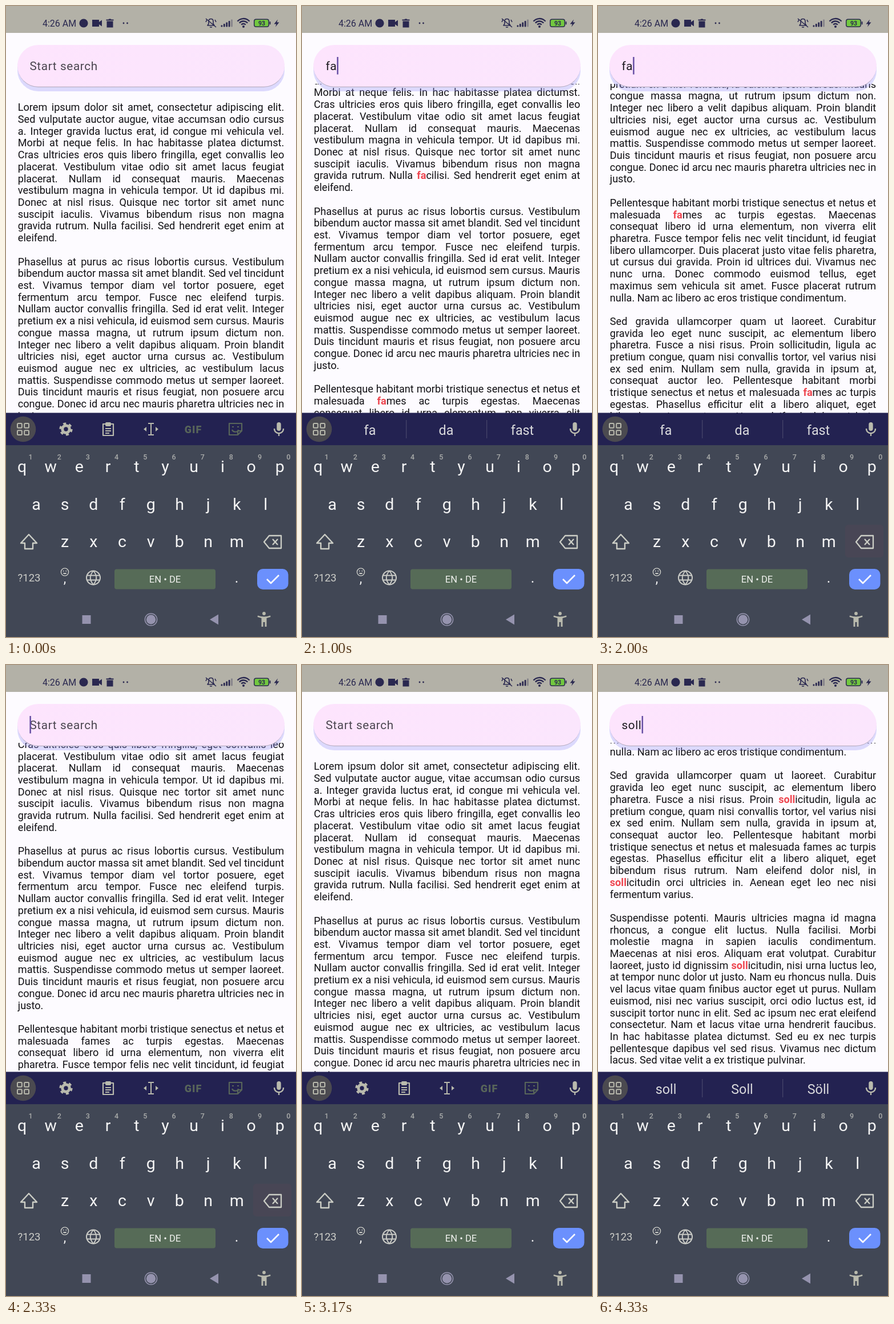
Recreate the animation shown at these times as an HTML page with a canvas. Size 508x1102 px, loop 4490 ms.

```html
<!DOCTYPE html>
<html lang="en">
<head>
<meta charset="utf-8">
<title>Text search</title>
<style>
html, body { margin: 0; width: 100%; height: 100%; overflow: hidden; background: #fdfbff; }
canvas { display: block; width: 508px; height: 1102px; }
</style>
</head>
<body>
<canvas id="stage"></canvas>
<script>
const W = 508, H = 1102, LOOP = 4490;
const LINE = 20.71, LEFT = 20.8, RIGHT = 487.2, MAX_SCROLL = 771, OMEGA = 0.016;
const FONT = 'Roboto, sans-serif';
const ICON = '#b9baad', KEY = '#f5f5f5', KEYBOARD = '#414755', INK = '#2a2850';

const lines = `Lorem ipsum dolor sit amet, consectetur adipiscing elit.
Sed vulputate auctor augue, vitae accumsan odio cursus
a. Integer gravida luctus erat, id congue mi vehicula vel.
Morbi at neque felis. In hac habitasse platea dictumst.
Cras ultricies eros quis libero fringilla, eget convallis leo
placerat. Vestibulum vitae odio sit amet lacus feugiat
placerat. Nullam id consequat mauris. Maecenas
vestibulum magna in vehicula tempor. Ut id dapibus mi.
Donec at nisl risus. Quisque nec tortor sit amet nunc
suscipit iaculis. Vivamus bibendum risus non magna
gravida rutrum. Nulla facilisi. Sed hendrerit eget enim at
eleifend.

Phasellus at purus ac risus lobortis cursus. Vestibulum
bibendum auctor massa sit amet blandit. Sed vel tincidunt
est. Vivamus tempor diam vel tortor posuere, eget
fermentum arcu tempor. Fusce nec eleifend turpis.
Nullam auctor convallis fringilla. Sed id erat velit. Integer
pretium ex a nisi vehicula, id euismod sem cursus. Mauris
congue massa magna, ut rutrum ipsum dictum non.
Integer nec libero a velit dapibus aliquam. Proin blandit
ultricies nisi, eget auctor urna cursus ac. Vestibulum
euismod augue nec ex ultricies, ac vestibulum lacus
mattis. Suspendisse commodo metus ut semper laoreet.
Duis tincidunt mauris et risus feugiat, non posuere arcu
congue. Donec id arcu nec mauris pharetra ultricies nec in
justo.

Pellentesque habitant morbi tristique senectus et netus et
malesuada fames ac turpis egestas. Maecenas
consequat libero id urna elementum, non viverra elit
pharetra. Fusce tempor felis nec velit tincidunt, id feugiat
libero ullamcorper. Duis placerat justo vitae felis pharetra,
ut cursus dui gravida. Proin id ultrices dui. Vivamus nec
nunc urna. Donec commodo euismod tellus, eget
maximus sem vehicula sit amet. Fusce placerat rutrum
nulla. Nam ac libero ac eros tristique condimentum.

Sed gravida ullamcorper quam ut laoreet. Curabitur
gravida leo eget nunc suscipit, ac elementum libero
pharetra. Fusce a nisi risus. Proin sollicitudin, ligula ac
pretium congue, quam nisi convallis tortor, vel varius nisi
ex sed enim. Nullam sem nulla, gravida in ipsum at,
consequat auctor leo. Pellentesque habitant morbi
tristique senectus et netus et malesuada fames ac turpis
egestas. Phasellus efficitur elit a libero aliquet, eget
bibendum risus rutrum. Nam eleifend dolor nisl, in
sollicitudin orci ultricies in. Aenean eget leo nec nisi
fermentum varius.

Suspendisse potenti. Mauris ultricies magna id magna
rhoncus, a congue elit luctus. Nulla facilisi. Morbi
molestie magna in sapien iaculis condimentum.
Maecenas at nisi eros. Aliquam erat volutpat. Curabitur
laoreet, justo id dignissim sollicitudin, nisi urna luctus leo,
at tempor nunc dolor ut justo. Nam eu rhoncus nulla. Duis
vel lacus vitae quam finibus auctor eget ut purus. Nullam
euismod, nisi nec varius suscipit, orci odio luctus est, id
suscipit tortor nunc in elit. Sed ac ipsum nec erat eleifend
consectetur. Nam et lacus vitae urna hendrerit faucibus.
In hac habitasse platea dictumst. Sed eu ex nec turpis
pellentesque dapibus vel sed risus. Vivamus nec dictum
lacus. Sed vitae velit a ex tristique pulvinar.`.split('\n');

// When the query changes, in ms
const edits = [[-700, ''], [660, 'f'], [949, 'fa'], [1353, 'fam'], [1900, 'fa'], [2180, 'f'],
  [2275, ''], [3320, 's'], [3483, 'so'], [3900, 'sol'], [4150, 'soll']];
const hints = {
  f: ['f', 'for', 'from'], fa: ['fa', 'da', 'fast'], fam: ['fam', 'family', 'ram'],
  s: ['s', 'so', 'she'], so: ['so', 'sorry', 'sounds'],
  sol: ['sol', 'solo', 'sold'], soll: ['soll', 'Soll', 'Söll']
};

const canvas = document.getElementById('stage');
const ctx = canvas.getContext('2d');
const dpr = window.devicePixelRatio || 1;
canvas.width = W * dpr;
canvas.height = H * dpr;

function rect(x, y, w, h, color, r = 0) {
  ctx.fillStyle = color;
  ctx.beginPath();
  ctx.roundRect(x, y, w, h, r);
  ctx.fill();
}

function disc(x, y, r, color, stroke = 0) {
  ctx.beginPath();
  ctx.arc(x, y, r, 0, 7);
  ctx.fillStyle = ctx.strokeStyle = color;
  ctx.lineWidth = stroke;
  stroke ? ctx.stroke() : ctx.fill();
}

// Path around (x, y): filled, or stroked when a width is given
function icon(x, y, d, color, stroke = 0) {
  const path = new Path2D(d);
  ctx.save();
  ctx.translate(x, y);
  ctx.fillStyle = ctx.strokeStyle = color;
  ctx.lineWidth = stroke;
  ctx.lineJoin = 'round';
  stroke ? ctx.stroke(path) : ctx.fill(path);
  ctx.restore();
}

function label(s, x, y, size, color, { align = 'center', weight = 400, spacing = 0 } = {}) {
  ctx.font = `${weight} ${size}px ${FONT}`;
  ctx.letterSpacing = spacing + 'px';
  ctx.textAlign = align;
  ctx.fillStyle = color;
  ctx.fillText(s, x, y);
  const w = ctx.measureText(s).width;
  ctx.letterSpacing = '0px';
  return w;
}

function targetFor(query) {
  if (!query) return 0;
  const i = lines.findIndex(l => l.toLowerCase().includes(query));
  return Math.min(i * LINE, MAX_SCROLL);
}

// Each edit starts a critically damped spring from wherever the page is
function stateAt(t) {
  let scroll = 0, i = 0;
  for (; i < edits.length && edits[i][0] <= t; i++) {
    const end = i + 1 < edits.length ? Math.min(t, edits[i + 1][0]) : t;
    const x = OMEGA * (end - edits[i][0]);
    const goal = targetFor(edits[i][1]);
    scroll = goal + (scroll - goal) * (1 + x) * Math.exp(-x);
  }
  const [since, query] = edits[i - 1];
  return {
    query, scroll,
    caret: (t - since) % 1000 < 500,
    erasing: t >= 1900 && t < 2450
  };
}

function setBody(bold) {
  ctx.font = `${bold ? 700 : 400} 18.1px ${FONT}`;
}

function splitWord(word, query) {
  const parts = query ? word.split(new RegExp(`(${query})`, 'i')) : [word];
  return parts.map((s, i) => {
    const hit = i % 2 === 1;
    setBody(hit);
    return { s, hit, w: ctx.measureText(s).width };
  });
}

function drawLine(text, y, query, justify) {
  const words = text.split(' ').map(w => splitWord(w, query));
  const total = words.flat().reduce((sum, p) => sum + p.w, 0);
  setBody(false);
  const gap = justify ? (RIGHT - LEFT - total) / (words.length - 1) : ctx.measureText(' ').width;
  let x = LEFT;
  for (const word of words) {
    for (const p of word) {
      setBody(p.hit);
      ctx.fillStyle = p.hit ? '#ee4650' : '#111014';
      ctx.fillText(p.s, x, y);
      x += p.w;
    }
    x += gap;
  }
}

function drawPage({ query, scroll, caret }) {
  rect(0, 47, W, 664, '#fdfbff');
  ctx.save();
  ctx.beginPath();
  ctx.rect(0, 136, W, 575);
  ctx.clip();
  ctx.textAlign = 'left';
  lines.forEach((text, i) => {
    const y = 183.3 + i * LINE - scroll;
    if (text && y > 125 && y < 735) drawLine(text, y, query, Boolean(lines[i + 1]));
  });
  ctx.restore();

  rect(20, 76, 468, 73, 'rgba(150,142,248,.32)', 36.5);
  rect(20.5, 69.5, 467, 72.5, '#b9b0c4', 36.2);
  const fill = ctx.createLinearGradient(20, 0, 488, 0);
  fill.addColorStop(0, '#fde4fd');
  fill.addColorStop(1, '#fbe6fd');
  rect(20, 68, 468, 72.7, fill, 36.3);

  const style = { align: 'left', spacing: 0.65 };
  let x = 41.4;
  if (query) x += label(query, x, 112.4, 20.7, '#1d1b20', style);
  else label('Start search', x, 112.4, 20.7, '#4b4650', style);
  if (caret) rect(x, 89, 2.5, 30.5, '#6750a4');
}

function drawStatus() {
  rect(0, 0, W, 47, '#b3b1a7');
  label('4:26 AM', 64, 35.5, 16, INK, { align: 'left' });
  disc(136, 30, 7.6, INK);
  icon(159, 30, 'M-8-6H4V-2L9-5.500V5.500L4 2V6H-8Z', INK);
  icon(182, 30, 'M-6.500-6.500H-2.500L-1.500-7.500H1.500L2.500-6.500H6.500V-4.500H-6.500ZM-5.500-3.500H5.500V7.500H-5.500Z', INK);
  disc(206, 30, 1.4, INK);
  disc(212.5, 30, 1.4, INK);
  icon(359, 29, 'M-6 5H6L4 2V-2C4-8-4-8-4-2V2ZM-2 8H2M-9-7L9 8M-9-1L-7-5M9-1L7-5', INK, 1.6);
  for (let i = 0; i < 5; i++) rect(376.5 + i * 4.4, 33.5 - i * 2.5, 2.8, 3 + i * 2.5, i < 4 ? INK : '#85838a', 1);
  for (const r of [5, 9.5, 14]) {
    ctx.beginPath();
    ctx.arc(416, 36, r, -Math.PI * 0.77, -Math.PI * 0.23);
    ctx.strokeStyle = INK;
    ctx.lineWidth = 2.3;
    ctx.stroke();
  }
  disc(416, 36, 2, INK);
  rect(434, 22.5, 27, 14.5, INK, 4);
  rect(435.5, 24, 24, 11.500, '#72c83f', 2.5);
  rect(461.5, 27, 2, 5.5, INK, 1);
  label('93', 448, 33.7, 10.5, INK, { weight: 700 });
  icon(474, 30, 'M2-6.500L-4.500 1.500H-.5L-2 6.500L4.500-1.500H.5Z', INK);
}

function drawGear(x, y) {
  ctx.setLineDash([5, 5.05]);
  disc(x, y, 9.6, ICON, 4);
  ctx.setLineDash([]);
  disc(x, y, 6.2, ICON, 5);
}

function drawToolbar(query) {
  rect(0, 710.5, W, 57, '#232251');
  disc(30, 739, 22.3, '#4b4a50');
  for (const dx of [-10, 2.2]) for (const dy of [-10, 2.2]) {
    ctx.strokeStyle = ICON;
    ctx.lineWidth = 2;
    ctx.beginPath();
    ctx.roundRect(30 + dx, 739 + dy, 7.8, 7.8, 1.5);
    ctx.stroke();
  }
  rect(474.3, 727, 7.4, 15, ICON, 3.7);
  icon(478, 739, 'M-8-1C-8 10 8 10 8-1M0 7V12', ICON, 2.3);

  if (query) {
    hints[query].forEach((s, i) => label(s, 119 + i * 133.5, 748.5, 23.3, '#d9d9dc'));
    for (const x of [182, 323]) rect(x, 723, 1.3, 32, '#45456a');
    return;
  }
  const dim = '#58655a';
  drawGear(105, 739);
  icon(179, 739, 'M-9-9H9V11H-9ZM-5-1H5M-5 3H5M-5 7H2', ICON, 2.2);
  rect(174, 727, 10, 7, ICON, 2);
  icon(254, 739, 'M-5-10H-1L0-9L1-10H5M-5 10H-1L0 9L1 10H5M0-9V9', ICON, 2);
  icon(254, 739, 'M-13 0L-8-4V4ZM13 0L8-4V4Z', ICON);
  label('GIF', 328, 745.5, 18, dim, { weight: 900, spacing: 1 });
  icon(402, 739, 'M-11-10H11V3L4 10H-11ZM11 3H4V10M-6 1C-4 6 4 6 5 1M-6-4H-3M3-4H6', dim, 2.2);
}

function drawKeyRow(chars, x, y) {
  [...chars].forEach((c, i) => label(c, x + i * 50.2, y, 28.5, KEY));
}

function drawKeyboard({ erasing }) {
  rect(0, 767, W, H - 767, KEYBOARD);
  if (erasing) rect(433, 906, 67, 57, '#484655', 5);
  drawKeyRow('qwertyuiop', 28, 814);
  [...'1234567890'].forEach((c, i) => label(c, 43 + i * 50.2, 792.3, 12.5, '#a9abaa', { weight: 500 }));
  drawKeyRow('asdfghjkl', 53, 879.5);
  drawKeyRow('zxcvbnm', 103, 945);

  icon(40, 936, 'M0-13L-14 2H-7V12H7V2H14Z', '#cbcdc5', 2.4);
  icon(467, 936, 'M-15 0L-6-11H15V11H-6ZM0-5L9 5M9-5L0 5', '#cbcdc5', 2.3);

  const soft = '#cccdc8';
  label('?123', 40.5, 1005, 18.5, soft);
  disc(103, 988.5, 6.6, soft, 1.4);
  disc(100.7, 986.7, 1, soft);
  disc(105.3, 986.7, 1, soft);
  icon(103, 989, 'M-3.500 1C-2 4 2 4 3.500 1Z', soft);
  label(',', 103, 1008, 23, KEY);
  disc(153, 998.5, 12, soft, 2);
  icon(153, 998.5, 'M0-12C-7-4-7 4 0 12C7 4 7-4 0-12M-11-4H11M-11 4H11', soft, 1.8);
  rect(190, 983.5, 177, 35, '#566b57', 4);
  label('EN • DE', 278.5, 1007, 16.6, '#eef0ec');
  label('.', 404, 1007, 25, KEY);
  rect(440, 983, 54.5, 36, '#6b90fd', 10);
  icon(467, 1001, 'M-10 0L-3 7L11-7', '#fff', 2.6);

  const nav = '#9593ae';
  rect(133.5, 1064, 15, 15, nav);
  disc(254, 1071.5, 10.6, nav, 1.5);
  disc(254, 1071.5, 8.2, nav);
  icon(365, 1071.5, 'M-8 0L7-9V9Z', nav);
  disc(452, 1061, 2.9, ICON);
  icon(452, 1071, 'M-11-6.500C-4-4 4-4 11-6.500L11.500-4L4.500-2V13H1.500V5H-1.500V13H-4.500V-2L-11.500-4Z', ICON);
}

// The screen refreshes six times a second, on 10 ms ticks
const tick = n => Math.round(n * 50 / 3) * 10;
function quantize(t) {
  let n = Math.floor((t + 10) * 6 / 1000);
  if (tick(n) > t) n--;
  return Math.min(tick(n), 4330);
}

const start = performance.now();
function draw() {
  const t = (performance.now() - start) % LOOP;
  const state = stateAt(quantize(t));
  ctx.setTransform(dpr, 0, 0, dpr, 0, 0);
  drawPage(state);
  drawStatus();
  drawToolbar(state.query);
  drawKeyboard(state);
  requestAnimationFrame(draw);
}
draw();
</script>
</body>
</html>
```
